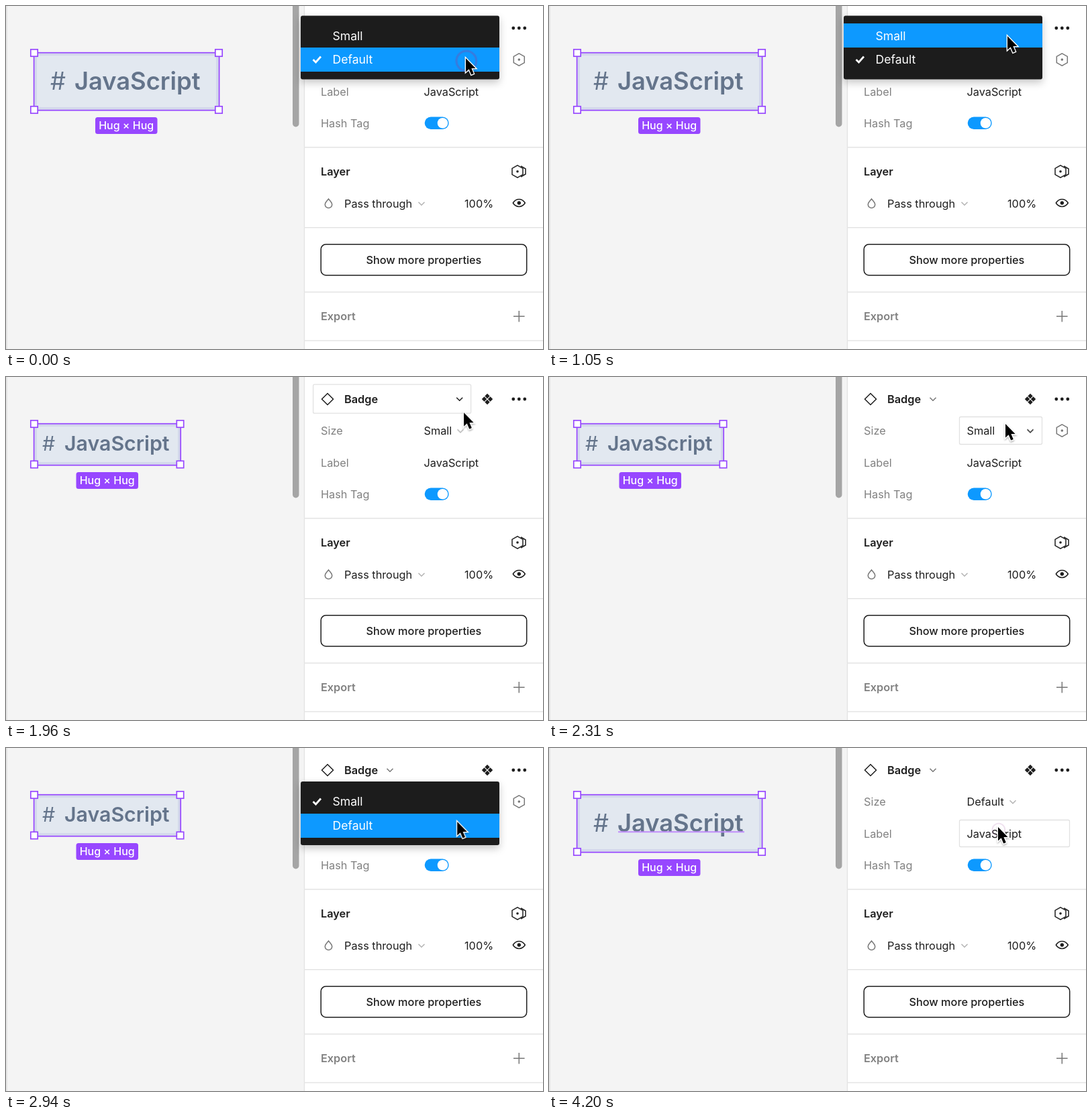
These frames come from a looping animation (800x512 px, 4.27 s). An HTML page:

```html
<!DOCTYPE html>
<html lang="en">
<head>
<meta charset="utf-8">
<title>Badge size property</title>
<style>
  html, body { margin: 0; width: 100%; height: 100%; overflow: hidden; background: #fff; }
  svg { display: block; width: 100%; height: 100%; }
  text { font: 400 16.3px Inter, sans-serif; fill: #1e1e1e; }
  .bold { font-weight: 600; }
  .medium { font-weight: 500; }
  .muted { fill: #808080; }
  .menu text { font-size: 17.6px; fill: #fff; }
  .tag text { font-size: 36.3px; fill: #64748b; }
  .tag .name { font-weight: 600; }
  .tag.small text { font-size: 30.3px; }
  .tag .hug { font-size: 16px !important; font-weight: 500; fill: #fff; text-anchor: middle; }
  .line { fill: none; stroke: #1e1e1e; stroke-width: 1.5; }
  .pale { stroke: #b3b3b3; }
  .gray { stroke: #777; }
  .rule { stroke: #e4e4e4; stroke-width: 1.4; }
  .field { fill: #fff; stroke: #e1e1e1; stroke-width: 1.3; }
  .handle { fill: #fff; stroke: #9747ff; stroke-width: 1.7; }

  .state { animation: 4.27s step-end infinite; }
  .default-size { animation-name: default-size; }
  .small-size { animation-name: small-size; }
  .header-idle { animation-name: header-idle; }
  .header-hover { animation-name: header-hover; }
  .size-hover { animation-name: size-hover; }
  .size-idle { animation-name: size-idle; }
  .size-active { animation-name: size-active; }
  .label-hover { animation-name: label-hover; }
  .first-menu { animation-name: first-menu; }
  .second-menu { animation-name: second-menu; }
  .move-up { animation-name: move-up; }
  .move-down { animation-name: move-down; }

  @keyframes default-size { 0%, 78.7% { opacity: 1 } 28.7% { opacity: 0 } 100% { opacity: 1 } }
  @keyframes small-size { 0%, 78.7% { opacity: 0 } 28.7% { opacity: 1 } 100% { opacity: 0 } }
  @keyframes header-idle { 0%, 46.7% { opacity: 1 } 28.7% { opacity: 0 } 100% { opacity: 1 } }
  @keyframes header-hover { 0%, 46.7% { opacity: 0 } 28.7% { opacity: 1 } 100% { opacity: 0 } }
  @keyframes size-hover { 0%, 56.6% { opacity: 0 } 46.7% { opacity: 1 } 100% { opacity: 0 } }
  @keyframes size-idle { 0%, 56.6% { opacity: 1 } 46.7% { opacity: 0 } 100% { opacity: 1 } }
  @keyframes size-active { 0%, 46.7% { opacity: 1 } 28.7%, 78.7% { opacity: 0 } 100% { opacity: 0 } }
  @keyframes label-hover { 0% { opacity: 0 } 78.7%, 100% { opacity: 1 } }
  @keyframes first-menu { 0% { opacity: 1 } 28.7%, 100% { opacity: 0 } }
  @keyframes second-menu { 0%, 78.7% { opacity: 0 } 56.6% { opacity: 1 } 100% { opacity: 0 } }
  @keyframes move-up { 0% { transform: none } 17.2%, 100% { transform: translateY(-36px) } }
  @keyframes move-down { 0% { transform: none } 65%, 100% { transform: translateY(36px) } }

  .cursor { animation: travel 4.27s cubic-bezier(.5, 1, .89, 1) infinite; }
  @keyframes travel {
    0%, 11.475% { transform: translate(685px, 78px) }
    24.6%, 44.26% { transform: translate(683px, 45px) }
    53.6%, 60.6% { transform: translate(680px, 70px) }
    70.5%, 96.72% { transform: translate(672px, 111px) }
    98.3%, 100% { transform: translate(669px, 118px) }
  }
  .ring { fill: none; stroke: rgb(150 60 150 / .5); stroke-width: 4; animation: click 4.27s linear infinite; }
  @keyframes click {
    0% { transform: scale(.5); opacity: .3 }
    1.64% { transform: scale(.8); opacity: .6 }
    3.28%, 6.5% { transform: none; opacity: 1 }
    11.475%, 100% { transform: none; opacity: 0 }
  }
</style>
</head>
<body>
<svg viewBox="0 0 800 512">
  <defs>
    <path id="chevron" d="M-4.5-2.2 0 2.3 4.5-2.2"/>
    <path id="hexagon" d="M0-9.2 8-4.6V4.6L0 9.2-8 4.6V-4.6Z"/>
    <path id="check" d="M457.5 80l4 4 7.5-8.5" fill="none" stroke="#fff" stroke-width="2.8"/>
    <rect id="handle" class="handle" x="-5.2" y="-5.2" width="10.4" height="10.4"/>
    <filter id="menu-shadow" x="-10%" y="-20%" width="120%" height="160%">
      <feDropShadow dx="0" dy="5" stdDeviation="6" flood-opacity=".22"/>
    </filter>
    <filter id="arrow-shadow" x="-50%" y="-30%" width="200%" height="180%">
      <feDropShadow dx="0" dy="1.5" stdDeviation="1.3" flood-opacity=".35"/>
    </filter>
  </defs>

  <!-- Canvas -->
  <rect width="444" height="512" fill="#f4f4f4"/>
  <rect width="2" height="512" fill="#e3e3e3"/>
  <rect x="427" y="-10" width="9.5" height="190.5" rx="4.7" fill="#a5a5a5"/>

  <g class="tag state default-size">
    <rect x="42" y="70" width="275" height="85" fill="#d3d8eb"/>
    <rect x="46" y="74" width="267" height="77" fill="#e2e8f0"/>
    <rect x="41.6" y="69.7" width="276" height="86" fill="none" stroke="#9747ff" stroke-width="1.7"/>
    <text x="66" y="125">#</text>
    <text class="name" x="102" y="125">JavaScript</text>
    <path class="state label-hover" d="M103 125.2H291" stroke="#c08dfa" stroke-width="2"/>
    <use href="#handle" x="42" y="70"/><use href="#handle" x="317" y="70"/>
    <use href="#handle" x="42" y="155"/><use href="#handle" x="317" y="155"/>
    <rect x="133" y="166" width="92.5" height="25" rx="3.5" fill="#9747ff"/>
    <text class="hug" x="179.2" y="184.4">Hug × Hug</text>
  </g>

  <g class="tag small state small-size">
    <rect x="42" y="70" width="218" height="61" fill="#d3d8eb"/>
    <rect x="46" y="74" width="210" height="53" fill="#e2e8f0"/>
    <rect x="41.6" y="69.7" width="218.6" height="62" fill="none" stroke="#9747ff" stroke-width="1.7"/>
    <text x="54" y="110">#</text>
    <text class="name" x="87" y="110">JavaScript</text>
    <use href="#handle" x="42" y="70"/><use href="#handle" x="259.5" y="70"/>
    <use href="#handle" x="42" y="130.5"/><use href="#handle" x="259.5" y="130.5"/>
    <rect x="104.5" y="142" width="92.5" height="25" rx="3.5" fill="#9747ff"/>
    <text class="hug" x="150.7" y="160.4">Hug × Hug</text>
  </g>

  <!-- Panel -->
  <rect x="444" width="356" height="512" fill="#fff"/>
  <path class="rule" d="M444.5 0V512M445 211H800M445 330.7H800M445 427H800M445 499.5H800"/>

  <g class="state header-hover">
    <rect class="field" x="457.6" y="11.2" width="235" height="43" rx="2"/>
    <use href="#chevron" class="line" x="675.7" y="33"/>
  </g>
  <use href="#chevron" class="line gray state header-idle" x="572" y="33"/>
  <path class="line" d="M479 24.5 487.5 33 479 41.5 470.5 33Z"/>
  <text class="bold" x="504" y="39">Badge</text>
  <path d="M717 24.8l3.7 3.7-3.7 3.7-3.7-3.7zM717 33.8l3.7 3.7-3.7 3.7-3.7-3.7zM712.5 29.3l3.7 3.7-3.7 3.7-3.7-3.7zM721.5 29.3l3.7 3.7-3.7 3.7-3.7-3.7z" fill="#1e1e1e"/>
  <g fill="#1e1e1e"><circle cx="755.8" cy="33" r="2.4"/><circle cx="764.3" cy="33" r="2.4"/><circle cx="772.8" cy="33" r="2.4"/></g>

  <text class="muted" x="469" y="86">Size</text>
  <rect class="field state size-hover" x="611.5" y="59.5" width="123" height="41" rx="2"/>
  <g class="state small-size">
    <text x="622.5" y="86">Small</text>
    <use href="#chevron" class="line pale state size-idle" x="677" y="80.5"/>
    <use href="#chevron" class="line state size-hover" x="717" y="80.5"/>
  </g>
  <g class="state default-size">
    <text x="622.5" y="86">Default</text>
    <use href="#chevron" class="line pale" x="691" y="80.5"/>
  </g>
  <g class="state size-active">
    <use href="#hexagon" class="line gray" x="764.3" y="80"/>
    <circle cx="764.3" cy="80" r="1.8" fill="#777"/>
  </g>

  <text class="muted" x="469" y="133.5">Label</text>
  <rect class="field state label-hover" x="611.5" y="107.5" width="164" height="40" rx="2"/>
  <text x="622.5" y="133.5">JavaScript</text>

  <text class="muted" x="469" y="180.8">Hash Tag</text>
  <rect x="623.7" y="165.5" width="36" height="18.5" rx="9.25" fill="#0d99ff"/>
  <circle cx="650.5" cy="174.7" r="7.8" fill="#fff"/>

  <text class="bold" x="469" y="253">Layer</text>
  <use href="#hexagon" class="line" x="762" y="247"/>
  <path class="line" d="M767 239l7 4v8l-7 4"/>
  <circle cx="762" cy="247" r="1.8" fill="#1e1e1e"/>

  <path class="line gray" d="M480.5 288c2.2 3 5.2 5.2 5.2 8.4a5.2 5.2 0 0 1-10.4 0c0-3.2 3-5.4 5.2-8.4Z"/>
  <text x="504" y="300.5">Pass through</text>
  <use href="#chevron" class="line pale" x="619" y="295"/>
  <text x="683" y="300.5">100%</text>
  <path class="line" d="M755.3 294c4.5-7.3 13.5-7.3 18 0-4.5 7.3-13.5 7.3-18 0Z"/>
  <circle cx="764.3" cy="294" r="2.7" fill="#1e1e1e"/>

  <rect class="line" x="469.2" y="355.7" width="306.5" height="46.3" rx="7.5"/>
  <text class="medium" x="622.4" y="384.8" text-anchor="middle">Show more properties</text>

  <text class="bold muted" x="469" y="469">Export</text>
  <path class="line gray" d="M764.3 455V471.5M756 463.2H772.6"/>

  <!-- Menus -->
  <g class="menu state first-menu">
    <rect x="439" y="14.5" width="296" height="95" rx="3" fill="#1e1e1e" filter="url(#menu-shadow)"/>
    <rect class="state move-up" x="439" y="62" width="296" height="36" fill="#0d99ff"/>
    <use href="#check"/>
    <text x="486.5" y="50.5">Small</text>
    <text x="486.5" y="86">Default</text>
  </g>
  <g class="menu state second-menu">
    <rect x="439" y="50" width="296" height="95" rx="3" fill="#1e1e1e" filter="url(#menu-shadow)"/>
    <rect class="state move-down" x="439" y="62" width="296" height="36" fill="#0d99ff"/>
    <use href="#check"/>
    <text x="486.5" y="86">Small</text>
    <text x="486.5" y="121.5">Default</text>
  </g>

  <g class="cursor">
    <g transform="translate(.8 4)">
      <circle class="ring" r="18.5" style="animation-delay: -70ms"/>
      <circle class="ring" r="18.5" style="animation-delay: -3080ms"/>
      <circle class="ring" r="18.5" style="animation-delay: -1890ms"/>
      <circle class="ring" r="18.5" style="animation-delay: -980ms"/>
    </g>
    <path d="M0 0V20.5L4.7 16.2 8.2 24.5 11.8 23 8.4 14.9H14.6Z" stroke="#fff" stroke-width="2.6" paint-order="stroke" filter="url(#arrow-shadow)"/>
  </g>
</svg>
</body>
</html>
```
